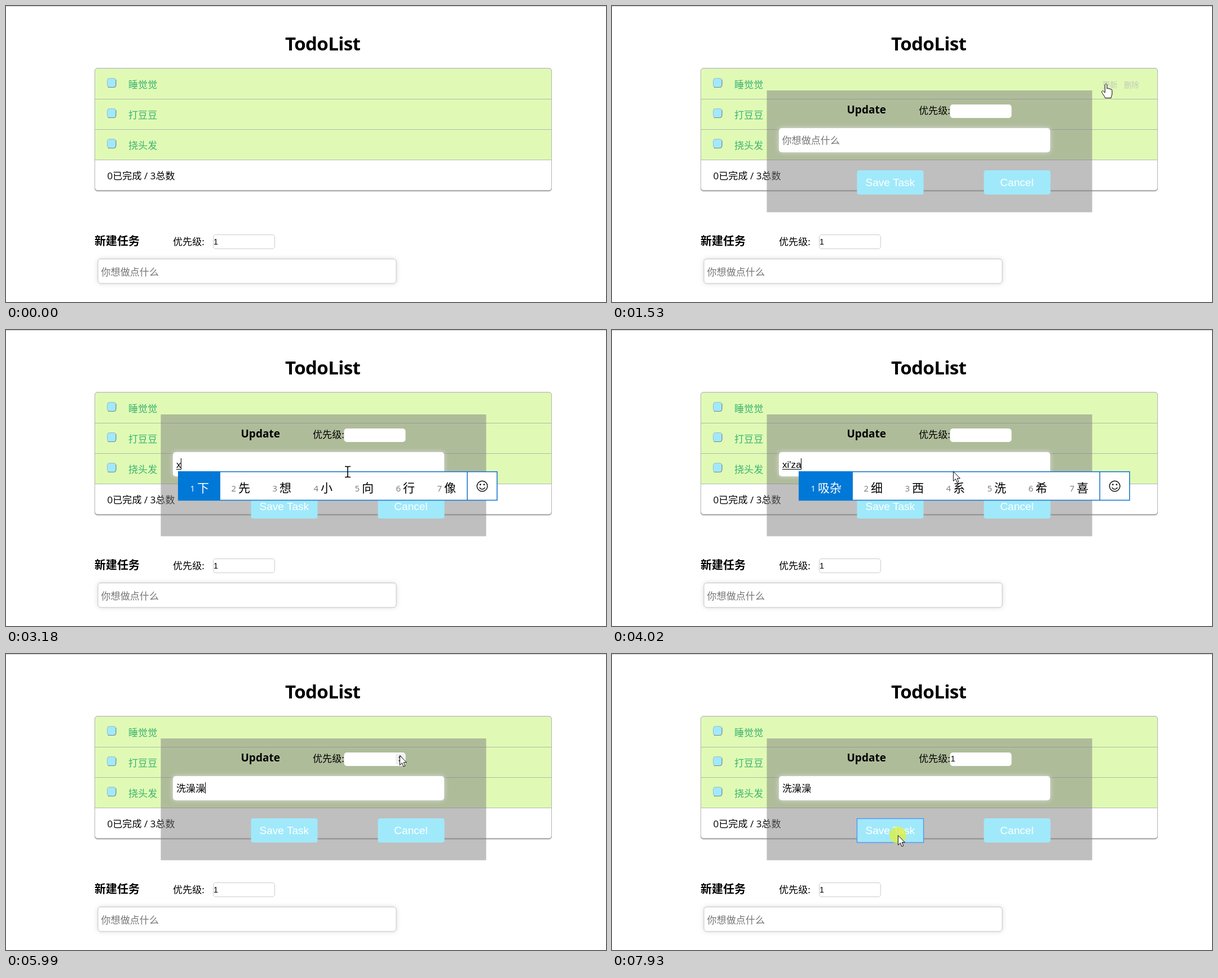
Write an HTML page that moves like this. It is 1064x526 px and loops after 8 s.

```html
<!DOCTYPE html>
<html lang="zh-CN">
<head>
<meta charset="utf-8">
<title>TodoList</title>
<style>
html, body { margin: 0; width: 100%; height: 100%; overflow: hidden; background: #fff; }
svg { display: block; width: 1064px; height: 526px; }
text { font: 17.1px "Open Sans", "Noto Sans CJK SC", "Noto Sans CJK", sans-serif; white-space: pre; }
.title { font-size: 33px; font-weight: 700; letter-spacing: -.6px; }
.head { font-size: 20px; font-weight: 700; }
.sub { font-size: 19px; font-weight: 700; }
.item { fill: #3cb371; }
.hint { fill: #757575; }
.num { font: 14.5px "Liberation Sans", sans-serif; }
.typed { font-family: "Liberation Sans", "Noto Sans CJK SC", "Noto Sans CJK", sans-serif; }
.btn { font: 19.1px "Liberation Sans", sans-serif; fill: #fff; text-anchor: middle; }
.link { font-size: 13.6px; fill: #c3c9bd; }
.key { font-size: 15px; fill: #777; }
.word { font-size: 21px; }
.picked { fill: #fff; }
.glow { filter: drop-shadow(0 0 4px #ddd); }
.cyan { fill: #a0e9fb; }
.line { fill: none; stroke: #b2b8ac; }
</style>
</head>
<body>
<svg viewBox="0 0 1064 526">
  <defs>
    <g id="box">
      <rect x="179.5" y="128.5" width="15.5" height="16" rx="4" fill="#a0e9ff" stroke="#a9b9b4"/>
      <path d="M181 144.5H191.500Q195 144.500 195 140.500V131" fill="none" stroke="#77858a"/>
    </g>
  </defs>

  <path d="M0 .5H1064" stroke="#c8c8c8"/>
  <text class="title" x="495" y="79">TodoList</text>

  <rect x="157.500" y="111" width="810" height="217" rx="4.500" fill="#fff" stroke="#b4b4b4" style="filter:drop-shadow(0 1px .5px #aaa)"/>
  <path d="M158 273V115Q158 111.500 161.500 111.500H963.500Q967 111.500 967 115V273Z" fill="#e0fab5"/>
  <path class="line" d="M158 165.500H967M158 219.500H967M158 273.500H967"/>
  <rect class="line" x="157.500" y="110.500" width="810" height="217" rx="4.500" style="stroke:#b4b4b4"/>
  <use href="#box"/><use href="#box" y="54"/><use href="#box" y="108"/>
  <text class="item" x="217" y="145.500">睡觉觉</text>
  <text class="item" x="217" y="199.500">打豆豆</text>
  <text class="item" x="217" y="253.500">挠头发</text>
  <text x="179.500" y="307.500">0已完成 / 3总数</text>
  <g id="links">
    <text class="link" x="869.500" y="144.500">更新</text>
    <text class="link" x="907.500" y="144.500">删除</text>
  </g>

  <text class="head" x="157" y="424.500">新建任务</text>
  <text x="296" y="424.500">优先级:</text>
  <rect x="367.500" y="406.500" width="109" height="25" rx="4.500" fill="#fff" stroke="#ccc"/>
  <text class="num" x="368" y="424">1</text>
  <rect class="glow" x="163" y="449.500" width="529" height="43.500" rx="5" fill="#fff" stroke="#c4c4c4"/>
  <text class="hint" x="168.500" y="478.500">你想做点什么</text>

  <g id="dialog">
    <rect x="274.500" y="150" width="577" height="216.500" fill="#808080" fill-opacity=".5"/>
    <text class="sub" x="416.500" y="191">Update</text>
    <text x="544" y="191.500">优先级:</text>
    <rect x="599.500" y="175" width="109" height="24" rx="5" fill="#fff"/>
    <g id="spin">
      <rect x="691" y="178" width="16" height="18" fill="#efefef"/>
      <path d="M695.500 184.500L699.200 180L702.900 184.500ZM695.500 188.500L699.200 193L702.900 188.500Z" fill="#505050"/>
    </g>
    <text class="num" id="level" x="600.500" y="191">1</text>
    <rect id="ring" x="599.500" y="174" width="109.500" height="25" rx="2.500" fill="none" stroke="#5b9bf8" stroke-width="1.800"/>
    <rect class="glow" x="296" y="217" width="481" height="43" rx="5" fill="#fff"/>
    <text class="hint" id="hint" x="301.500" y="244.500">你想做点什么</text>
    <text class="typed" id="typed" x="302" y="244.500"></text>
    <path id="under" stroke="#000"/>
    <path id="caret" stroke="#000"/>
    <rect class="cyan" x="434.500" y="292" width="118" height="43" rx="4"/>
    <rect class="cyan" x="659.500" y="292" width="118" height="43" rx="4"/>
    <rect class="cyan" id="press" x="434.500" y="292.500" width="118" height="42.500" stroke="#4d90fe" stroke-width="1.300"/>
    <text class="btn" x="493.300" y="320">Save Task</text>
    <text class="btn" x="718" y="320">Cancel</text>
  </g>

  <g id="ime"></g>
  <circle id="click" r="15" fill="#e0f032" fill-opacity=".72"/>

  <g id="cursor" stroke="#000" stroke-linejoin="round">
    <path id="arrow" d="M.3 .5V17.500L4.300 13.700L7 20L9.800 18.800L7.200 12.700H12.300Z" fill="#fff"/>
    <path id="hand" d="M-1.800 16V2.200C-1.800 .2 1.800 .2 1.800 2.200V9C2.200 7.500 5 7.700 5 9.500C5.700 8.300 8 8.700 8 10.500C8.800 9.500 10.800 10 10.800 12V18C10.800 21 9 22 9 25.500H-1.500C-2 22.500-5 20-7.300 15.500C-8.300 13.500-5.800 12-4.200 13.500Z" fill="#fff"/>
    <path id="beam" d="M-4 -8.500H-.5M2.500 -8.500H6M1 -7.500V9.500M-4 10.500H-.5M2.500 10.500H6M-.5 -8.500L1 -7.500L2.500 -8.500M-.5 10.500L1 9.500L2.500 10.500" fill="none" stroke-width="1.600"/>
  </g>
</svg>
<script>
const $ = id => document.getElementById(id);
const show = (id, on) => $(id).style.display = on ? '' : 'none';
const within = (t, a, b) => t >= a && t < b;
const LOOP = 8000;

// Pointer strokes: start, end, steps, then a cubic path
const moves = [
  [130, 900, 11, [815, 485], [900, 330], [1015, 160], [871, 132]],
  [1130, 1210, 2, [871, 132], [873, 134], [875, 137], [876, 138]],
  [1610, 2160, 8, [876, 138], [830, 150], [680, 235], [609, 251]],
  [2240, 2240, 1, [609, 251], [608, 251], [606, 251], [605, 251]],
  [5300, 5990, 10, [605, 251], [625, 235], [670, 195], [698, 180]],
  [6600, 7000, 6, [698, 180], [776, 205], [776, 305], [704, 326]],
  [7080, 7380, 5, [704, 326], [650, 328], [560, 324], [507, 322]]
];

// Typing: time, letters, popup left edge, candidates
const typing = [
  [3180, "x", 305, "下 先 想 小 向 行 像"],
  [3410, "xi", 305, "下 先 想 小 向 行 像"],
  [3490, "xi", 309, "系 西 洗 细 喜 吸 希"],
  [3580, "xiz", 309, "系 西 洗 细 喜 吸 希"],
  [3730, "xiz", 318, "下载 选择 限制 现在 性质 行走 写作"],
  [4020, "xi'za", 331, "吸杂 细 西 系 洗 希 喜"],
  [4130, "xi'zao", 340, "洗澡 洗 细 西 系 希 喜"],
  [4290, "xi'zao'z", 352, "洗澡在 洗澡 洗 细 西 系 喜"],
  [4430, "xi'zao'za", 361, "洗澡杂 洗澡 洗 细 西 系 喜"],
  [4520, "xi'zao'zao", 371, "洗澡澡 洗澡 洗 细 西 系 喜"],
  [4750, "洗澡澡", 0, ""]
];
const clicks = [[1360, 1440], [2470, 2550], [6310, 6390], [7930, LOOP]];
const carets = [[2470, 3020], [3180, 5300], [5830, 6310]];
const anyOf = (list, t) => list.some(([a, b]) => within(t, a, b));

function pointer(t) {
  const [a, b, n, ...p] = moves.filter(m => t >= m[0]).pop() || moves[0];
  const gap = n > 1 ? (b - a) / (n - 1) : 1;
  const i = Math.max(0, Math.min(n - 1, Math.floor((t - a + 4) / gap)));
  const k = (i + 1) / n, u = k * k * (3 - 2 * k), v = 1 - u;
  const w = [v * v * v, 3 * v * v * u, 3 * v * u * u, u * u * u];
  return [0, 1].map(d => Math.round(w.reduce((s, c, j) => s + c * p[j][d], 0)));
}

function popup(left, list) {
  if (!list) return '';
  let x = left, cells = '', blue = 0;
  list.split(' ').forEach((word, i) => {
    const c = i ? '' : ' picked';
    cells += `<text class="key${c}" x="${x + 21.5}" y="287">${i + 1}</text>
      <text class="word${c}" x="${x + 34}" y="288">${word}</text>`;
    x += 52 + 21 * word.length;
    if (!i) blue = x - left + 2;
  });
  const sep = x + 2, face = x + 28.5;
  return `<rect x="${left + .8}" y="251.800" width="${sep + 52 - left}" height="50.700" fill="#fff" stroke="#1e78cd" stroke-width="1.600"/>
    <rect x="${left}" y="251" width="${blue}" height="52" fill="#0078d7"/>${cells}
    <path d="M${sep} 252V303" stroke="#1e78cd" stroke-width="1.600"/>
    <g fill="none" stroke="#111" stroke-width="1.500" transform="translate(${face} 277.500)">
      <circle r="9.300"/><path d="M-5 2.500Q0 8.500 5 2.500"/>
      <g fill="#111" stroke="none"><circle cx="-3.300" cy="-2.800" r="1.400"/><circle cx="3.300" cy="-2.800" r="1.400"/></g>
    </g>`;
}

let stage;
function type(t) {
  const now = typing.filter(s => t >= s[0]).pop();
  if (now !== stage) {
    stage = now;
    $('typed').textContent = now ? now[1] : '';
    $('ime').innerHTML = now ? popup(now[2], now[3]) : '';
  }
  const end = 302 + (now ? $('typed').getComputedTextLength() : 0);
  const cx = Math.floor(end) + .5;
  show('hint', !now);
  show('under', now && now[3]);
  $('under').setAttribute('d', `M302 247.500H${end}`);
  show('caret', anyOf(carets, t));
  $('caret').setAttribute('d', `M${cx} 228V248`);
}

function draw() {
  const t = performance.now() % LOOP;
  const [x, y] = pointer(t);
  const inside = (l, r, a, b) => x >= l && x < r && y >= a && y < b;
  const open = t >= 1440;

  const covered = open && inside(274, 852, 150, 367);
  const row = Math.floor((y - 111) / 54);
  show('links', t >= 130 && !covered && inside(158, 967, 111, 273));
  $('links').setAttribute('transform', `translate(0 ${row * 54})`);

  show('dialog', open);
  const step = t < 1530 ? 80 / 170 : 1;
  $('dialog').setAttribute('transform', `translate(0 ${Math.round(376 * (1 - step))})`);
  const focus = within(t, 6310, 7930);
  show('level', t >= 6310);
  show('ring', focus);
  show('spin', focus || open && inside(600, 709, 175, 199));
  show('press', t >= 7930);
  type(t);

  show('click', anyOf(clicks, t));
  $('click').setAttribute('transform', `translate(${x} ${y})`);

  const field = open && (inside(296, 777, 217, 260) || inside(600, 691, 175, 199));
  const beam = field && !within(t, 3490, 4750);
  const hand = !covered && inside(868, 899, 130, 149);
  show('cursor', t >= 130);
  $('cursor').setAttribute('transform', `translate(${x} ${y})`);
  show('beam', beam);
  show('hand', hand);
  show('arrow', !beam && !hand);
  requestAnimationFrame(draw);
}
draw();
</script>
</body>
</html>
```
